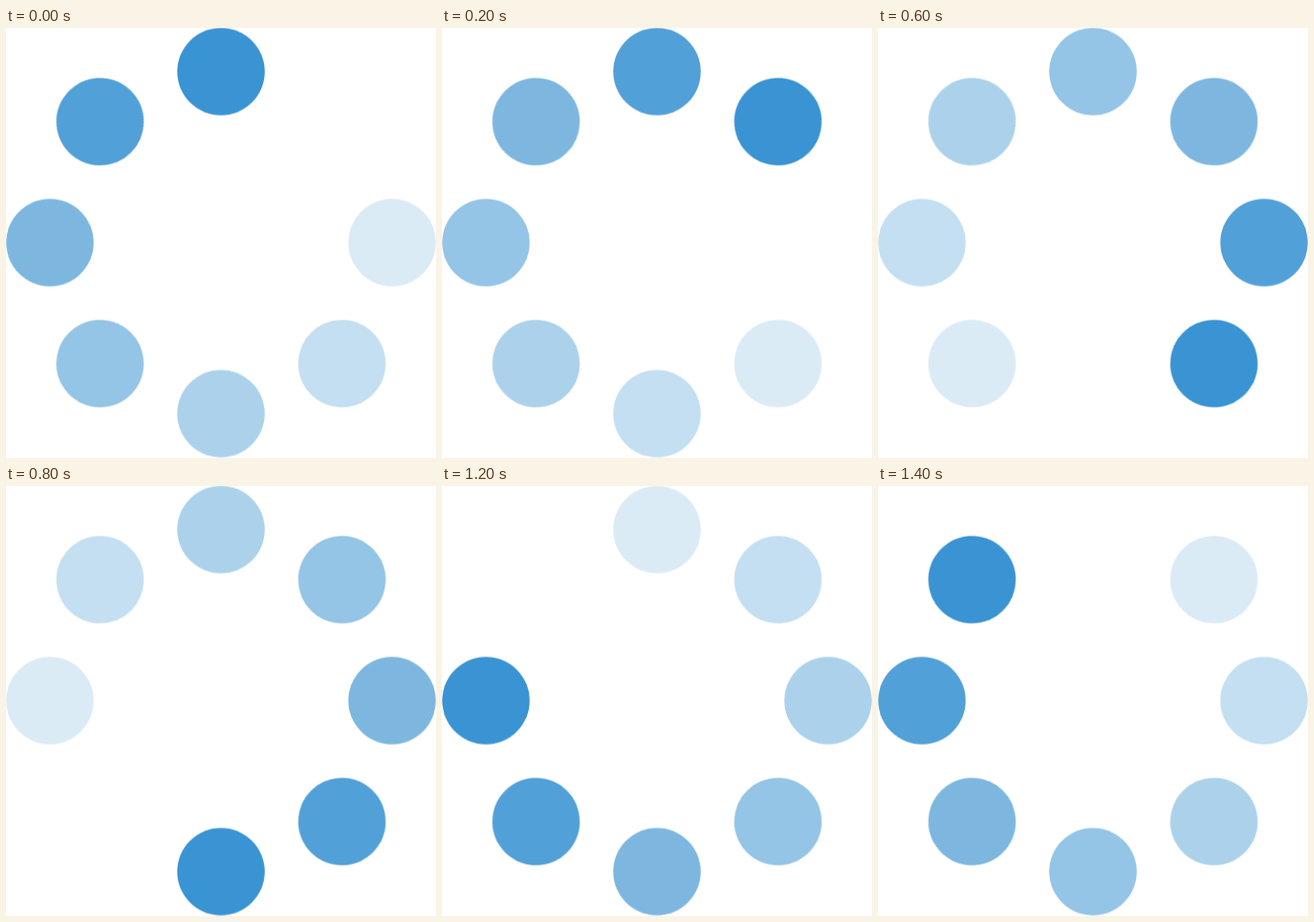
Recreate the animation shown at these times as an HTML page. Size 460x460 px, loop 1600 ms.

```html
<!DOCTYPE html>
<html lang="en">
<head>
<meta charset="utf-8">
<title>Loading</title>
<style>
  html, body { margin: 0; width: 100%; height: 100%; overflow: hidden; background: #fff; }
  svg { display: block; width: 100%; height: 100%; }
  .ring { animation: turn 1600ms steps(8, end) infinite; }
  @keyframes turn { to { transform: rotate(360deg); } }
</style>
</head>
<body>
<svg viewBox="0 0 460 460" role="img" aria-label="Loading">
  <g transform="translate(230 229.6)">
    <g class="ring">
      <circle cy="-183" r="46.8" fill="#3a93d2"/>
      <circle cy="-183" r="46.8" fill="#52a0d8" transform="rotate(-45)"/>
      <circle cy="-183" r="46.8" fill="#7db7e0" transform="rotate(-90)"/>
      <circle cy="-183" r="46.8" fill="#94c4e6" transform="rotate(-135)"/>
      <circle cy="-183" r="46.8" fill="#acd2eb" transform="rotate(-180)"/>
      <circle cy="-183" r="46.8" fill="#c4dff1" transform="rotate(-225)"/>
      <circle cy="-183" r="46.8" fill="#dbebf6" transform="rotate(-270)"/>
    </g>
  </g>
</svg>
</body>
</html>
```
